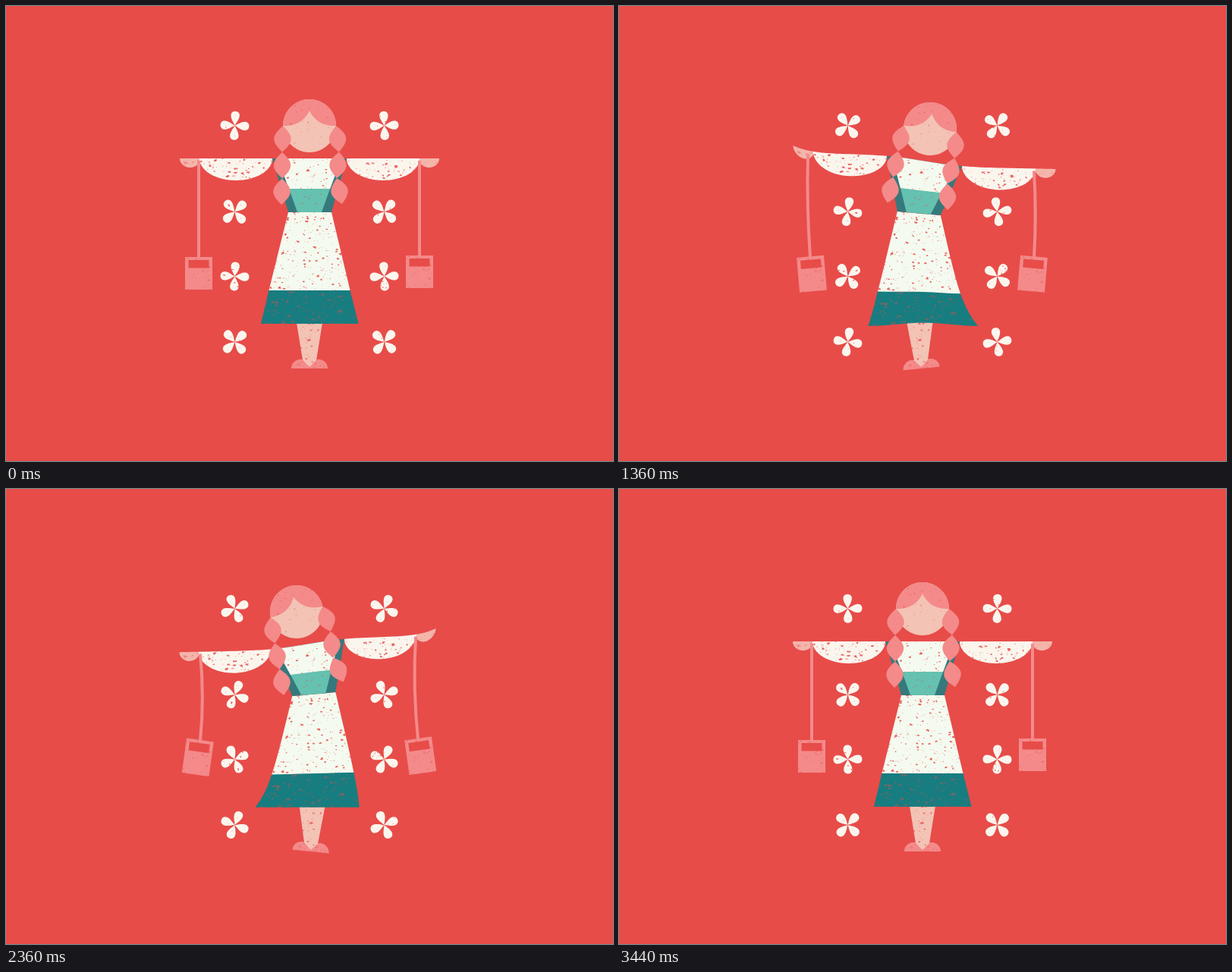
These frames come from a looping animation (800 by 600 pixels, 3480 ms). An HTML page with a canvas:

```html
<!DOCTYPE html>
<html lang="en">
<head>
<meta charset="utf-8">
<title>Milkmaid</title>
<style>
  html, body { margin: 0; width: 100%; height: 100%; overflow: hidden; background: #e74c49; }
  canvas { display: block; }
</style>
</head>
<body>
<canvas id="stage" width="800" height="600"></canvas>
<script>
const ctx = document.getElementById('stage').getContext('2d');
const RED = '#e74c49', PINK = '#f48a8a', SKIN = '#f3c3b5', HAND = '#f4b5ab',
      CREAM = '#faf6ee', WHITE = '#f4faef', TEAL = '#167d80', MINT = '#65c1b0', STRAP = '#35797c';
const LOOP = 3480, STEP = 40;

let seed = 11;
const rand = () => (seed = (seed * 16807) % 2147483647) / 2147483647;
const mix = (a, b, k) => a + (b - a) * k;
const ease = (t, start, end) => {
  const k = Math.min(1, Math.max(0, (t - start) / (end - start)));
  return k * k * (3 - 2 * k);
};

// Lean of the body: 0 upright, 1 to the right, -1 to the left.
// Loose parts follow with a lag and take longer to settle.
const lean = (t, lag = 0, settled = 2800) => ease(t - lag, 0, 780)
  - 2 * ease(t - lag, 1330, 1900) + ease(t, 2360 + lag, settled);
const follow = (t, lag) => lean(t, lag, 3200);

// Shape builders
const samples = (n, f) => Array.from({ length: n + 1 }, (_, i) => f(i / n));
const arc = (x, y, rx, ry, from, to, n = 32) => samples(n, k => {
  const a = mix(from, to, k) * Math.PI;
  return [x + rx * Math.cos(a), y + ry * Math.sin(a)];
});
const bezier = (p, q, r, n = 10) => samples(n, k => [0, 1].map(i =>
  mix(mix(p[i], q[i], k), mix(q[i], r[i], k), k)));
const poly = (...points) => points.flatMap((p, i) => {
  const next = points[(i + 1) % points.length];
  return samples(9, k => [mix(p[0], next[0], k), mix(p[1], next[1], k)]);
});
const bowl = (x, y, rx, ry) => [...arc(x, y, rx, ry, 0, 1), ...samples(16, k => [x - rx + 2 * rx * k, y])];

function part(shape, color, count = 0, alpha = 1, size = 1) {
  const xs = shape.map(p => p[0]), ys = shape.map(p => p[1]);
  const x0 = Math.min(...xs), x1 = Math.max(...xs), y0 = Math.min(...ys), y1 = Math.max(...ys);
  const specks = Array.from({ length: count }, () => {
    const x = mix(x0, x1, rand()), y = mix(y0, y1, rand());
    const r = size * (.45 + 1.6 * rand() ** 4), tilt = rand() * 6.3;
    return samples(4, k => {
      const a = tilt + k * 5, l = r * (.4 + rand());
      return [x + l * 1.2 * Math.cos(a), y + l * .8 * Math.sin(a)];
    });
  });
  return { shape, color, specks, alpha };
}

function trace(points, warp) {
  points.forEach((p, i) => {
    const [x, y] = warp(p);
    i ? ctx.lineTo(x, y) : ctx.moveTo(x, y);
  });
  ctx.closePath();
}
function draw({ shape, color, specks, alpha }, warp = p => p) {
  ctx.save();
  ctx.beginPath();
  trace(shape, warp);
  ctx.fillStyle = color;
  ctx.fill();
  ctx.clip();
  ctx.beginPath();
  specks.forEach(s => trace(s, warp));
  ctx.globalAlpha = alpha;
  ctx.fillStyle = RED;
  ctx.fill();
  ctx.restore();
}
function place(x, y, angle, paint) {
  ctx.save();
  ctx.translate(x, y);
  ctx.rotate(angle);
  paint();
  ctx.restore();
}

// Parts
const petals = [0, 1, 2, 3].flatMap(i => samples(24, k => {
  const s = k * 2 * Math.PI, a = i * Math.PI / 2;
  const x = 8 * Math.sin(s) * Math.abs(Math.sin(s / 2)) ** 1.4, y = 9.5 * (Math.cos(s) - 1);
  return [x * Math.cos(a) - y * Math.sin(a), x * Math.sin(a) + y * Math.cos(a)];
}));
const flowers = [0, 1, 2, 3].flatMap(row => [-1, 1].map(side =>
  ({ x: 400 + side * 98.5, y: 157.7 + row * 95 - row % 2 * 0 - 0, side, row, art: part(petals, CREAM, 8 + 5 * row, .85) })));
flowers.forEach(f => f.y = 157.7 + 198.8 * (f.row >> 1) + f.row % 2 * (113.5 - 27 * (f.row >> 1)));

const sides = [-1, 1];
const arms = sides.flatMap(side => [
  part(bowl(400 + side * 157.5, 201, 13.5, 12), HAND, 10, .5),
  part(bowl(400 + side * 97, 201, 48, 29), CREAM, 100, .85)
]);
const bodice = [
  part(poly([351, 201], [449, 201], [429, 272], [372, 272]), STRAP, 20, .25),
  part(poly([358, 201], [442, 201], [427, 241.5], [373, 241.5]), WHITE, 75, .85),
  part(poly([373, 241], [427, 241], [416, 272], [384, 272]), MINT, 30, .4)
];
const skirt = [
  part(poly([346.5, 374.5], [453.5, 374.5], [464.5, 419], [336, 419]), TEAL, 230, .42, 1.2),
  part(poly([372, 272], [429, 272], [453.5, 375], [346.5, 375]), WHITE, 290, .85)
];
const legs = [
  ...sides.map(side => part(bowl(400 + side * 12, -478, 12, 12).map(([x, y]) => [x, -y]), PINK, 8, .3)),
  part(poly([382.5, 415], [417.5, 415], [409, 467], [400, 476], [391, 467]), SKIN, 60, .7)
];
const face = part(arc(0, 0, 35, 35, 0, 2, 60), SKIN, 70, .6, .8);
const hair = part([...arc(0, 0, 35, 35, 1, 2, 40),
  ...bezier([35, 0], [10, 1], [0, -20]), ...bezier([0, -20], [-10, 1], [-35, 0])], PINK, 50, .4, .8);
const LEAF = 34.7;
const leafSide = side => samples(20, k => [side * 11.2 * Math.sin(Math.PI * k), LEAF * k]);
const leaf = part([...leafSide(1), ...leafSide(-1).reverse()], PINK, 10, .25, .8);
const pail = part(poly([-18, 0], [18, 0], [18, 43], [-18, 43]), PINK, 50, .45, .9);
const buckets = [{ side: -1, x: 254, y: 331 }, { side: 1, x: 545, y: 329 }];
const braids = [{ side: -1, rest: [-1, 0, -1] }, { side: 1, rest: [4, -3, 7] }];

// Body deformation for one lean
function pose(b) {
  const size = Math.abs(b), right = Math.max(b, 0);
  // The lower arm drops evenly, the raised one curls up at its end.
  const lift = v => 3.5 + 9.7 * Math.tanh(3 * v) + v ** 7 * (6 - 5 * v);
  const shoulder = ([x, y]) => {
    const u = (x - 400) / 171;
    return [x + b * (2.5 + 2 * u), y + size * lift(u * Math.sign(b))];
  };
  const waist = ([x, y]) => [x - 5.3 * b, y + b * (1.4 + .09 * (x - 400))];
  const torso = p => {
    const k = (p[1] - 201) / 71, s = shoulder(p), w = waist(p);
    return [mix(s[0], w[0], k), mix(s[1], w[1], k)];
  };
  const dress = ([x, y]) => {
    const k = (y - 272) / 147, q = (x - 400.3) / (28.5 + .242 * (y - 272));
    const [topX, topY] = waist([x, y]);
    const flare = mix(-7.5 * size, 5 * size + 4 * b, (q + 1) / 2);
    const wave = right * (1.8 * Math.sin(Math.PI * k) - 2.3 * k ** 4 * Math.cos(Math.PI * q));
    return [mix(topX, x + flare, k ** 6), mix(topY, y + .8 * size, k) + wave];
  };
  const stance = ([x, y]) => {
    const k = (y - 419) / 59;
    return [x - b * mix(3.6, 1.6, k), y - .1 * b * (x - 400) * k];
  };
  return { shoulder, torso, dress, stance };
}

function drawHead(t, b) {
  const h = follow(t, 100);
  const x = 400 + 13.5 * h - 3.5 * Math.abs(h), y = 158 + 4 * Math.max(Math.abs(b), Math.abs(h));
  const tilt = (x - 400) * .0122;
  place(x, y, tilt, () => { draw(face); draw(hair); });
  for (const { side, rest } of braids) {
    let jx = x + side * 35 * Math.cos(tilt), jy = y + side * 35 * Math.sin(tilt);
    rest.forEach((offset, i) => {
      const dx = offset - 6.5 * follow(t, 100 + 70 * i);
      place(jx, jy, -Math.asin(dx / LEAF), () => draw(leaf));
      jx += dx;
      jy += Math.sqrt(LEAF ** 2 - dx * dx);
    });
  }
}

function drawBucket({ side, x, y }, t, b, { shoulder }) {
  const size = Math.abs(b), swing = follow(t, 20);
  const turn = side * swing * (6.5 - 1.5 * swing);
  const bounce = 4 * size * (1 - size) * (5 + 16 * side * Math.max(b, 0));
  const topX = x + side * 3.5 * b - 1.5 * size, topY = shoulder([x, 204])[1];
  const endX = x + side * 2 * swing, endY = y + bounce;
  ctx.beginPath();
  ctx.moveTo(topX, topY);
  ctx.quadraticCurveTo((topX + endX) / 2 + turn * .7, (topY + endY) / 2, endX, endY + 1);
  ctx.strokeStyle = PINK;
  ctx.lineWidth = 4;
  ctx.stroke();
  place(endX, endY, turn * Math.PI / 180, () => {
    ctx.scale(1, 1 + .07 * size);
    draw(pail);
    ctx.fillStyle = RED;
    ctx.fillRect(-13.5, 4, 27, 10.5);
  });
}

function render(t) {
  ctx.fillStyle = RED;
  ctx.fillRect(0, 0, 800, 600);
  const spin = t / LOOP * 2 * Math.PI + .05;
  for (const { x, y, side, row, art } of flowers)
    place(x, y, -side * (spin + row % 2 * Math.PI / 4), () => draw(art));

  const b = lean(t), body = pose(b);
  legs.forEach(p => draw(p, body.stance));
  skirt.forEach(p => draw(p, body.dress));
  bodice.forEach(p => draw(p, body.torso));
  arms.forEach(p => draw(p, body.shoulder));
  buckets.forEach(bucket => drawBucket(bucket, t, b, body));
  drawHead(t, b);
}

function tick() {
  const t = performance.now() % LOOP;
  render(Math.floor(t / STEP) * STEP);
  requestAnimationFrame(tick);
}
tick();
</script>
</body>
</html>
```
